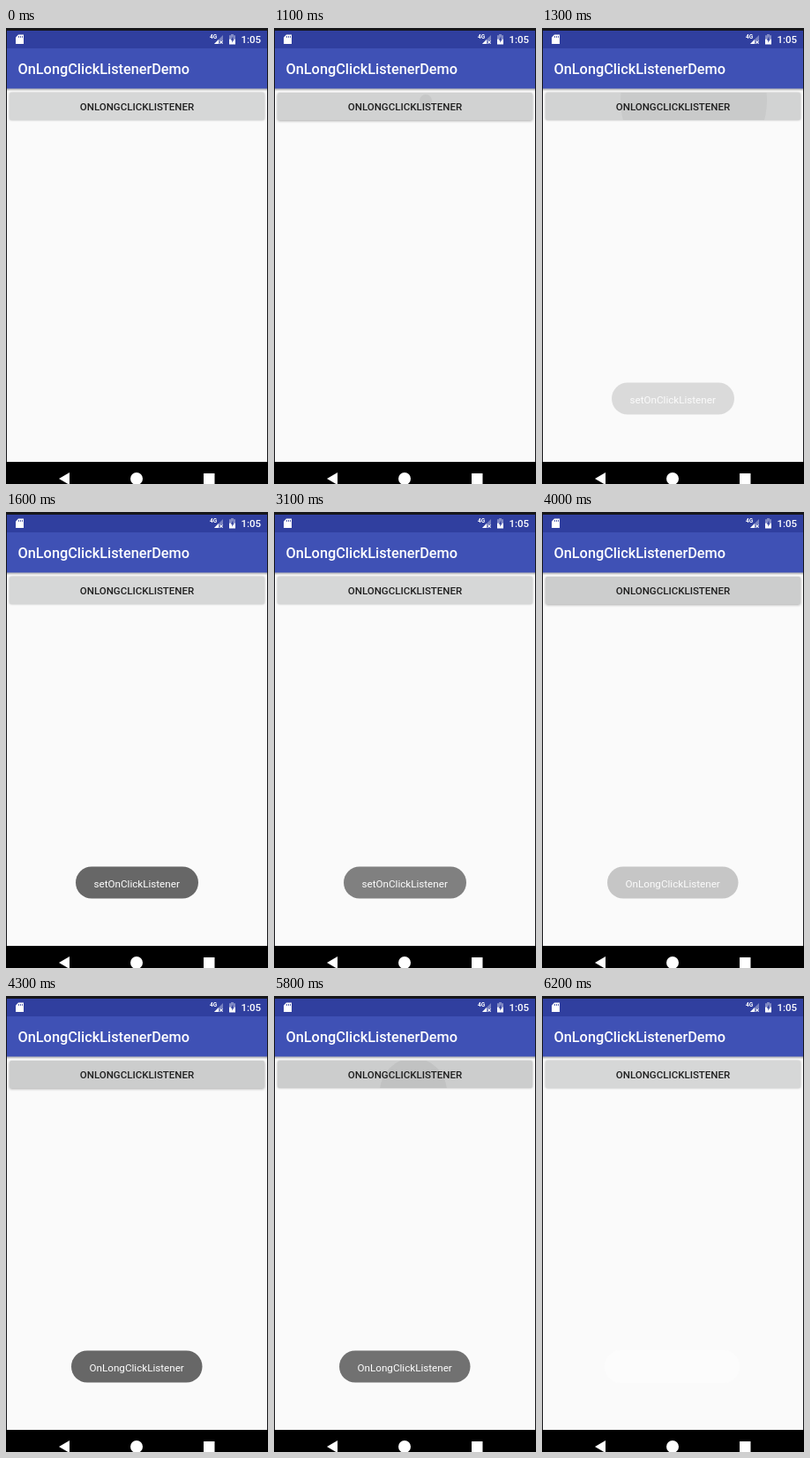
An HTML page for the animation above (9100 ms loop, 297 px wide and 515 px high).

```html
<!DOCTYPE html>
<html lang="en">
<head>
<meta charset="utf-8">
<style>
  html, body { margin: 0; width: 100%; height: 100%; overflow: hidden; background: #000; }
  svg { display: block; width: 297px; height: 515px; font-family: Roboto, sans-serif; }
  .medium { font-weight: 500; }
</style>
</head>
<body>
<svg viewBox="0 0 297 515">
  <defs>
    <clipPath id="buttonClip"><rect x="4" y="73" width="289" height="31" rx="2"/></clipPath>
    <linearGradient id="barShadow" x2="0" y2="1">
      <stop stop-color="#000" stop-opacity=".3"/>
      <stop offset="1" stop-color="#000" stop-opacity="0"/>
    </linearGradient>
  </defs>

  <rect width="297" height="515" fill="#16161a"/>
  <rect x="1" y="3" width="295" height="487" fill="#fafafa"/>
  <rect x="1" y="3" width="295" height="20" fill="#303f9f"/>
  <rect x="1" y="23" width="295" height="45.500" fill="#3f51b5"/>
  <rect x="1" y="68.500" width="295" height="3" fill="url(#barShadow)"/>

  <!-- status bar -->
  <g fill="#fff">
    <path d="M14 7.500h6v10.500h-9v-7.500z"/>
    <path d="M14.500 9v2M16.500 9v2M18.500 9v2" stroke="#303f9f" stroke-width=".8"/>
    <text x="231" y="12" font-size="6.500" font-weight="700">4G</text>
    <path d="M246 8v10h-10z" opacity=".35"/>
    <path d="M241 13v5h-5z"/>
    <path d="M242.500 14.500l3 3m0-3l-3 3" stroke="#fff"/>
    <path d="M255 7h3v1.300h2v4.200h-7v-4.200h2z" opacity=".4"/>
    <path d="M253 12.500h7v6h-7z"/>
    <path d="M257.300 9.500l-2.500 4.200h1.500v3l2.300-4.200h-1.300z" fill="#303f9f"/>
    <text class="medium" x="266.500" y="17" font-size="11.500">1:05</text>
    <text class="medium" x="13.500" y="52" font-size="16.300">OnLongClickListenerDemo</text>
  </g>

  <rect id="button" x="4" y="73" width="289" height="31" rx="2" fill="#d6d7d7"/>
  <g clip-path="url(#buttonClip)">
    <rect id="tint" x="4" y="73" width="289" height="31"/>
    <circle id="ripple"/>
  </g>
  <text class="medium" x="148.500" y="92.500" font-size="11.500" text-anchor="middle" fill="#1f1f1f">ONLONGCLICKLISTENER</text>

  <rect id="residue" x="71" y="400" width="153" height="37" rx="18" fill="#fcfcfc"/>
  <g id="toast">
    <rect id="pill" y="400.500" height="36" rx="18" fill="#676767"/>
    <text id="message" x="148.200" y="423.500" font-size="11.650" text-anchor="middle" fill="#fff"/>
  </g>

  <!-- navigation bar -->
  <rect y="490" width="297" height="25" fill="#000"/>
  <g fill="#fff">
    <path d="M60 509l12-7v14z"/>
    <circle cx="148" cy="509" r="7"/>
    <rect x="224" y="503" width="12.500" height="13"/>
  </g>
</svg>
<script>
const LOOP = 9100, STEP = 100;
const el = id => document.getElementById(id);
const set = (id, attrs) => {
  for (const name in attrs) el(id).setAttribute(name, attrs[name]);
};
const clamp = v => Math.min(1, Math.max(0, v));
const ease = (t, start, duration = 400) =>
  (1 - Math.cos(Math.PI * clamp((t - start) / duration))) / 2;

const toasts = [
  { text: 'setOnClickListener', x: 79, width: 139, from: 1300, fadeIn: 1180, fadeOut: 2990 },
  { text: 'OnLongClickListener', x: 74, width: 148.5, from: 4000, fadeIn: 3840, fadeOut: 5730 }
];
const presses = [
  { down: 1100, up: 1200, x: 172, y: 82, radius: 7, ripple: 1100, depth: .024 },
  { down: 3600, up: 5800, x: 158, y: 108, radius: 38, ripple: 5800, depth: .048 }
];

function drawToast(t) {
  const toast = toasts[t < 3600 ? 0 : 1];
  const opacity = t < toast.from ? 0 : ease(t, toast.fadeIn) * (1 - ease(t, toast.fadeOut));
  set('toast', { opacity });
  set('pill', { x: toast.x, width: toast.width });
  el('message').textContent = toast.text;
  set('residue', { opacity: t >= 6200 ? 1 : 0 });
}

function drawButton(t) {
  const press = presses[t < 3000 ? 0 : 1];
  const held = t >= press.down && t <= press.up;
  const fade = t < press.down ? 0 : 1 - clamp((t - press.up) / 400);
  const age = t - press.ripple;
  const raised = held && t < 5800;
  set('tint', { opacity: press.depth * fade });
  set('ripple', {
    cx: press.x, cy: press.y,
    r: press.radius + Math.max(0, age) * .38,
    opacity: age < 0 ? 0 : .055 * fade
  });
  el('button').style.filter = raised
    ? 'drop-shadow(0 1.5px 1.5px rgba(0,0,0,.32))'
    : 'drop-shadow(0 .7px .8px rgba(0,0,0,.28))';
}

function draw(now) {
  const t = Math.floor(now % LOOP / STEP) * STEP;
  drawButton(t);
  drawToast(t);
}

const begin = performance.now();
function tick() {
  draw(performance.now() - begin);
  requestAnimationFrame(tick);
}
tick();
</script>
</body>
</html>
```
